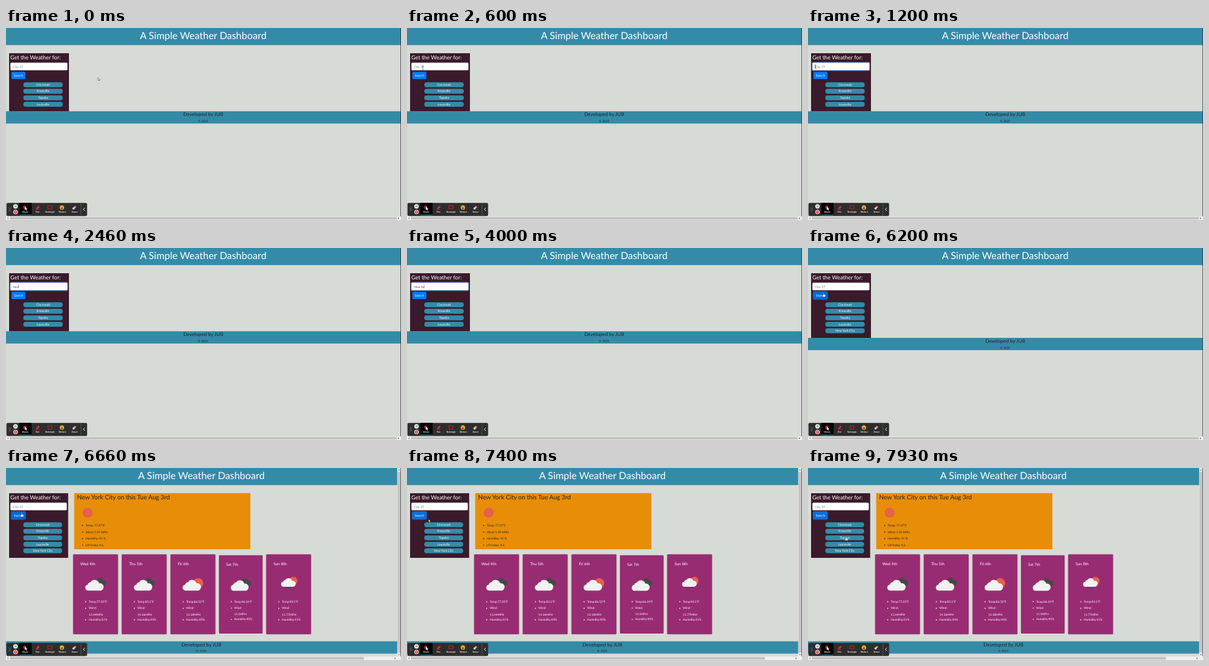
Recreate the animation shown at these times as an HTML page. Size 640 by 312 pixels, loop 8000 ms.

```html
<!DOCTYPE html>
<html lang="en">
<head>
<meta charset="utf-8">
<title>A Simple Weather Dashboard</title>
<style>
  html, body { margin: 0; width: 100%; height: 100%; overflow: hidden; background: #d7dbd5; }
  svg { display: block; width: 100%; height: 100%; }
  text { font-family: Lato, "Open Sans", sans-serif; text-rendering: geometricPrecision; white-space: pre; }
</style>
</head>
<body>
<svg id="stage" viewBox="0 0 640 312" preserveAspectRatio="xMinYMin meet">
  <defs>
    <path id="cloud" d="M5 19a5 5 0 0 1-.6-9.9A5.4 5.4 0 0 1 9 5.2 7.6 7.6 0 0 1 22.8 7a6 6 0 0 1 2.4 12z"/>
  </defs>
</svg>
<script>
const LOOP = 8000, RESULTS = 6660, ADDED = 6130, FOCUS = 1060;
const TEAL = '#348ba8', PURPLE = '#982c72', SUN = '#e5614c';
const stage = document.getElementById('stage');

function el(parent, tag, attrs = {}, content) {
  const node = document.createElementNS('http://www.w3.org/2000/svg', tag);
  for (const key in attrs) node.setAttribute(key, attrs[key]);
  if (content !== undefined) node.textContent = content;
  parent.appendChild(node);
  return node;
}
const group = (parent, transform = '') => el(parent, 'g', { transform });
const rect = (parent, x, y, width, height, fill, rx = 0, more = {}) =>
  el(parent, 'rect', { x, y, width, height, fill, rx, ...more });
const circle = (parent, cx, cy, r, fill) => el(parent, 'circle', { cx, cy, r, fill });
const path = (parent, d, fill, more = {}) => el(parent, 'path', { d, fill, ...more });
const line = (parent, d, stroke, width) => path(parent, d, 'none', { stroke, 'stroke-width': width });
const label = (parent, x, y, size, fill, content, more = {}) =>
  el(parent, 'text', { x, y, 'font-size': size, fill, ...more }, content);
const MID = { 'text-anchor': 'middle' };
const show = (node, on) => node.setAttribute('display', on ? 'inline' : 'none');
const set = (node, attrs) => { for (const key in attrs) node.setAttribute(key, attrs[key]); };

// Page header and footer
rect(stage, 0, 0, 640, 312, '#d7dbd5');
rect(stage, 0, 0, 640, 27.8, TEAL);
const title = label(stage, 319.5, 18.4, 15.95, '#fff', 'A Simple Weather Dashboard', MID);
const footer = group(stage);
rect(footer, 0, 0, 640, 20, TEAL);
const credits = group(footer);
label(credits, 319.5, 8, 8, '#212529', 'Developed by JUB', MID);
label(credits, 319.5, 17.8, 5, '#212529', '© 2021', MID);

// Search panel
const panel = rect(stage, 5, 41, 97, 94.3, '#3a1a2b');
label(stage, 7, 51.4, 8.95, '#fff', 'Get the Weather for:');
const glow = rect(stage, 6, 55.2, 94.5, 14.6, '#80bdff', 2.2);
const field = rect(stage, 7.2, 56.4, 92.2, 12.2, '#fff', 1.5, { stroke: '#ced4da', 'stroke-width': .4 });
const input = label(stage, 11.3, 64.6, 4.9, '#6c757d', '');
const caret = rect(stage, 0, 59.6, .5, 6, '#333');
const ring = rect(stage, 7.6, 70, 24.8, 14.2, '#26588f', 2.2);
const button = rect(stage, 8.8, 71.2, 22.6, 11.8, '#007bff', 1.5);
label(stage, 20.1, 78.9, 5, '#fff', 'Search', MID);
const pills = ['Cincinnati', 'Knoxville', 'Topeka', 'Louisville', 'New York City'].map((city, i) => {
  const pill = group(stage, `translate(0 ${88.2 + i * 10.6})`);
  return { pill, box: rect(pill, 28, 0, 64, 8, TEAL, 4), name: label(pill, 60, 5.7, 5.05, '#fff', city, MID) };
});

// Results
const results = group(stage);
rect(results, 110.5, 40.8, 285.5, 91.2, '#e88d07');
label(results, 115.3, 50.8, 10.05, '#212529', 'New York City on this Tue Aug 3rd');
circle(results, 132.3, 72.7, 8.1, SUN);

function bullet(parent, x, y, fill, content) {
  circle(parent, x, y - 1.5, .85, fill);
  label(parent, x + 5, y, 4.8, fill, content);
}
['Temp: 77.97°F', 'Wind: 5.99 MPH', 'Humidity: 41 %', 'UV Index: 4.6']
  .forEach((row, i) => bullet(results, 124.2, 94.9 + i * 10.65, '#212529', row));

function weatherIcon(card, kind) {
  const icon = group(card, kind === 'rain' ? 'translate(24 37) scale(.8)' : 'translate(19.5 39.5)');
  const cloud = (fill, transform) => el(icon, 'use', { href: '#cloud', fill, transform });
  if (kind === 'cloudy') cloud('#484848', 'translate(13 -2.6) scale(.72)');
  else circle(icon, 25.5, 7.5, 8.2, SUN);
  if (kind === 'rain') {
    cloud('#484848', 'translate(11 6) scale(.62)');
    line(icon, 'M11 20l-2 5M16 20l-2 5M21 20l-2 5', '#484848', 1.3);
  }
  cloud('#f2f2f2', 'translate(0 .5)');
}
[
  ['Wed 4th', '77.05', '13.44', 51, 'cloudy'],
  ['Thu 5th', '85.1', '14.36', 44, 'cloudy'],
  ['Fri 6th', '86.52', '13.18', 40, 'sunny'],
  ['Sat 7th', '86.34', '11.5', 40, 'cloudy'],
  ['Sun 8th', '90.1', '11.77', 41, 'rain']
].forEach(([day, temp, wind, humidity, kind], i) => {
  const place = i === 3 ? 'translate(345 141.7) scale(.97 .98)' : `translate(${[108.6, 187.4, 266.4, 0, 421.4][i]} 140.3)`;
  const card = group(results, place);
  rect(card, 0, 0, 73, 130, PURPLE, 1.4);
  label(card, 12, 18.1, 6.3, '#fff', day);
  weatherIcon(card, kind);
  bullet(card, 20.6, 78.5, '#fff', `Temp:${temp}°F`);
  bullet(card, 20.6, 89.1, '#fff', 'Wind:');
  label(card, 25.6, 99.5, 4.8, '#fff', `${wind}MPH`);
  bullet(card, 20.6, 107.9, '#fff', `Humidity:${humidity}%`);
});

// Scrollbars
const sideBar = group(stage);
rect(sideBar, 633.8, 0, 6.2, 307, '#eceeec');
rect(sideBar, 634.4, 6, 4.6, 294, '#c4c4c4');
path(sideBar, 'M635.3 4l1.4-2 1.4 2zM635.3 302.5l1.4 2 1.4-2z', '#666');
rect(stage, 639.3, 0, .7, 306, '#222');
rect(stage, 0, 306.4, 640, 5.6, '#f0f0f0');
const thumb = rect(stage, 6.3, 307.2, 627, 4, '#c1c1c1');
path(stage, 'M3.9 307.7v3l-2-1.5z', '#777');
const rightArrow = path(stage, 'M635.2 307.7v3l2-1.5z', '#555');

// Recorder toolbar
const bar = group(stage);
rect(bar, .8, 284.2, 130.6, 21.4, '#2e2e2e', 2);
for (let i = 0; i < 8; i++) circle(bar, 5.2 + (i % 2) * 1.8, 292 + (i >> 1) * 1.7, .5, '#888');
circle(bar, 15.4, 289.8, 3.6, '#f3f3f3');
rect(bar, 14, 288.2, .9, 3.2, '#2c7a4b');
rect(bar, 15.9, 288.2, .9, 3.2, '#2c7a4b');
circle(bar, 15.4, 299, 3.6, '#f3f3f3');
circle(bar, 15.4, 299, 2.6, '#d9344f');
line(bar, 'M14.4 298l2 2m0-2l-2 2', '#fff', .6);
rect(bar, 21.6, 284.2, 19.8, 20.4, '#000');
rect(bar, 21.6, 303.4, 19.8, 1, '#2fa9b8');
['Mouse', 'Pen', 'Rectangle', 'Stickers', 'Eraser'].forEach((tool, i) =>
  label(bar, 31.2 + i * 20, 300, 3.4, '#fff', tool, { ...MID, 'font-weight': 700 }));
circle(bar, 30.4, 291.2, 2.7, '#b3202f');
path(bar, 'M30.6 290.4l4 3.7-1.8.2 1 2-.9.4-1-2-1.3 1.2z', '#fff');
path(bar, 'M48.5 294.5l.8-2.6 3.2-3.2 2 2-3.3 3.2z', '#e0283c');
line(bar, 'M48.6 295h5', '#e0283c', .7);
rect(bar, 67.9, 289, 6.4, 5, 'none', 0, { stroke: '#c5202f', 'stroke-width': 1 });
circle(bar, 90.6, 291.8, 3.5, '#f6bd3c');
circle(bar, 89.3, 290.9, .6, '#4a3210');
circle(bar, 91.9, 290.9, .6, '#4a3210');
path(bar, 'M88.5 292.3h4.2a2.1 2 0 0 1-4.2 0z', '#7a3d16');
path(bar, 'M107.6 292.9l4-4 2.2 2.1-4 4h-1z', '#e79aa6');
path(bar, 'M107.6 292.9l1.6-1.6 2.2 2.1-1.6 1.6h-1z', '#f4d5da');
rect(bar, 121.2, 285, .5, 19.6, '#777');
line(bar, 'M127.6 292.2l-2.2 2.4 2.2 2.4', '#fff', 1);

// Pointers, tip at the origin
const pointers = { arrow: group(stage), beam: group(stage), hand: group(stage) };
const OUTLINE = { stroke: '#222', 'stroke-width': .5, 'stroke-linejoin': 'round' };
path(pointers.arrow, 'M0 0v4.7l1.1-1 .8 1.7.8-.4-.7-1.6h1.5z', '#fff', OUTLINE);
line(pointers.beam, 'M-1-3h2M0-3v6M-1 3h2', '#444', .5);
path(pointers.hand, 'M-.6 0a.6.6 0 0 1 1.2 0v2.3l2 .5q.8.2.7 1.2l-.5 2.6h-3.4l-2-3q.6-.9 2 .4z', '#fff', OUTLINE);

const moves = [
  [0, 149, 80.5], [60, 149, 80.5], [730, 12.5, 63], [5600, 12.5, 63],
  [6000, 25.3, 73], [7130, 25.3, 73], [7930, 61.5, 111.5]
];
const typing = [
  [0, ''], [1930, 'N'], [2200, 'Ne'], [2400, 'Ney'], [2800, 'Ne'], [3060, 'New'], [3200, 'New '],
  [3730, 'New Y'], [4000, 'New Yo'], [4260, 'New Yor'], [4330, 'New York'], [4400, 'New York '],
  [4930, 'New York C'], [5400, 'New York Ci'], [5460, 'New York Cit'], [5530, 'New York City'], [ADDED, '']
];
const latest = (list, t) => list.filter(([at]) => at <= t).pop();

function pointerAt(t) {
  const i = moves.findIndex(([at]) => at > t);
  if (i < 0) return moves[moves.length - 1].slice(1);
  const [t0, x0, y0] = moves[i - 1], [t1, x1, y1] = moves[i];
  const p = (t - t0) / (t1 - t0), k = p * p * (3 - 2 * p);
  return [x0 + (x1 - x0) * k, y0 + (y1 - y0) * k];
}

function draw(t) {
  const done = t >= RESULTS, added = t >= ADDED;
  const shrink = done ? 1 : 0;

  set(title, { x: done ? 316.6 : 319.5 });
  set(footer, { transform: `translate(0 ${done ? 281.6 : added ? 146 : 135.3})` });
  set(credits, { transform: `translate(${done ? -2.9 : 0} 0)` });
  set(panel, { width: 97 - shrink * 1.3, height: added ? 105 : 94.3 });
  set(field, { width: 92.2 - shrink });
  pills.forEach(({ pill, box, name }, i) => {
    set(box, { width: 64 - shrink });
    set(name, { x: 60 - shrink / 2 });
    show(pill, i < 4 || added);
  });
  show(results, done);
  show(sideBar, done);
  set(thumb, { width: done ? 573.5 : 627 });
  set(rightArrow, { transform: `translate(${done ? -5.6 : 0} 0)` });

  const [x, y] = pointerAt(t);
  const inside = (l, top, r, b) => x >= l && x <= r && y >= top && y <= b;
  const overButton = inside(8.8, 71.2, 31.4, 83);
  const overPill = x >= 28 && x <= 91 && y >= 88 && (y - 88.2) % 10.6 < 8;
  const kind = inside(7, 56, 99.5, 69) ? 'beam' : overButton || overPill ? 'hand' : 'arrow';
  const hidden = t >= 1930 && t < 5600;
  for (const name in pointers) {
    show(pointers[name], name === kind && !hidden);
    set(pointers[name], { transform: `translate(${x} ${y})` });
  }

  const pressed = t >= 6060;
  const focused = t >= FOCUS && !pressed;
  const [typedAt, text] = latest(typing, t);
  input.textContent = text || 'City, ST';
  set(input, { fill: text ? '#495057' : '#6c757d' });
  set(glow, { opacity: focused ? Math.min(1, (t - FOCUS) / 150) * .55 : 0 });
  set(field, { stroke: focused ? '#80bdff' : '#ced4da' });
  set(caret, { x: 11.3 + (text ? input.getComputedTextLength() : 0) });
  show(caret, focused && (t - Math.max(typedAt, FOCUS)) % 1000 < 500);
  show(ring, pressed);
  set(button, { fill: overButton ? '#0069d9' : pressed ? '#0a6fe0' : '#007bff' });
}

function tick(now) {
  draw(now % LOOP);
  requestAnimationFrame(tick);
}
draw(0);
requestAnimationFrame(tick);
</script>
</body>
</html>
```
